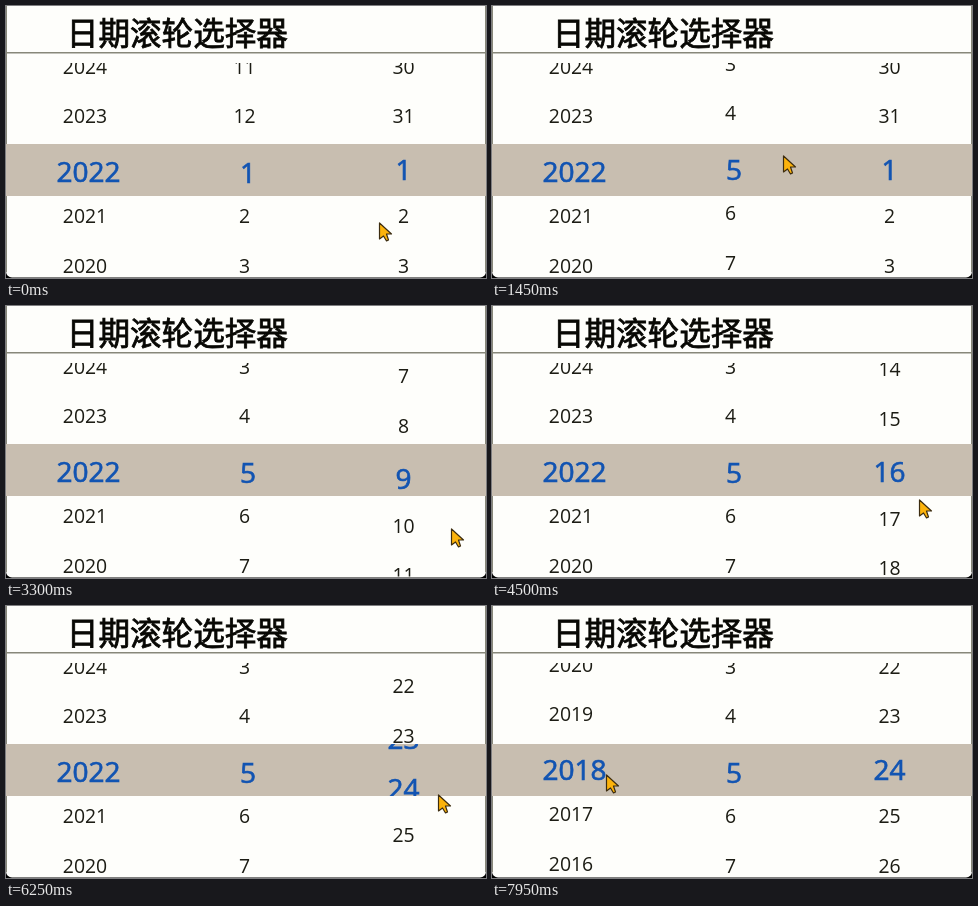
Recreate the animation shown at these times as an HTML page with a canvas. Size 480x272 px, loop 8000 ms.

```html
<!DOCTYPE html>
<html lang="zh">
<head>
<meta charset="utf-8">
<title>日期滚轮选择器</title>
<style>
  html, body { margin: 0; width: 100%; height: 100%; overflow: hidden; background: #000; }
  canvas { display: block; }
</style>
</head>
<body>
<canvas id="stage" width="480" height="272"></canvas>
<script>
const ctx = document.getElementById('stage').getContext('2d');
const LOOP = 8000;
const ROW = 49.75;
const BAND = { top: 138, height: 52 };
const PAPER = '#fefefb', INK = '#1c1c14', BLUE = '#1254b2', RULE = '#88887a', BAND_COLOR = '#c8beb0';

const clamp = u => Math.min(1, Math.max(0, u));
const ease = u => u * u * (3 - 2 * u);
const wrap = (n, size) => ((n - 1) % size + size) % size + 1;

// Each flick is [start time, rows]; a longer flick takes more time.
const flickProgress = (t, start, rows) => ease(clamp((t - start) / (400 + 100 * Math.abs(rows))));

const wheels = [
  { x: 79, bigX: 82.5, bigY: 165.6, label: i => 2022 - i,
    flicks: [[7140, 4.04]] },
  { x: 238.5, bigX: 242, bigY: 166.6, label: i => wrap(1 + i, 12),
    flicks: [[300, 2], [840, 2.06], [1450, -0.06]] },
  { x: 397.5, bigX: 397.5, bigY: 163.6, label: i => wrap(1 + i, 31),
    flicks: [[1750, 4], [2608, 4], [3459, 7], [5212, 8]] }
];

const wheelPosition = (wheel, t) =>
  wheel.flicks.reduce((sum, [start, rows]) => sum + rows * flickProgress(t, start, rows), 0);

// Pointer tip at its turning points.
const stops = [
  { t: 0, x: 373, y: 217 }, { t: 850, x: 250, y: 222 }, { t: 1450, x: 291, y: 150 },
  { t: 1750, x: 398, y: 222 }, { t: 2550, x: 426, y: 100 }, { t: 3300, x: 445, y: 223 },
  { t: 3800, x: 457, y: 100 }, { t: 4500, x: 427, y: 194 }, { t: 5600, x: 455, y: 48 },
  { t: 6250, x: 432, y: 189 }, { t: 7000, x: 218, y: 188 }, { t: 7420, x: 100, y: 2 },
  { t: 7950, x: 114, y: 169 }, { t: LOOP, x: 114, y: 169 }
];

function pointerAt(t) {
  const n = stops.findIndex(stop => stop.t > t);
  const a = stops[n - 1], b = stops[n];
  const u = ease((t - a.t) / (b.t - a.t));
  return [a.x + (b.x - a.x) * u, a.y + (b.y - a.y) * u];
}

function clipped(top, height, draw) {
  ctx.save();
  ctx.beginPath();
  ctx.rect(0, top, 480, height);
  ctx.clip();
  draw();
  ctx.restore();
}

function boldText(text, x, y, weight) {
  ctx.fillText(text, x, y);
  if (!weight) return;
  ctx.lineWidth = weight;
  ctx.strokeText(text, x, y);
}

function drawRows(wheel, t, x, centerY, size, color, weight) {
  const position = wheelPosition(wheel, t);
  const nearest = Math.round(position);
  ctx.font = `${size}px "Open Sans", "Noto Sans", sans-serif`;
  ctx.textAlign = 'center';
  ctx.fillStyle = ctx.strokeStyle = color;
  for (let i = nearest - 3; i <= nearest + 3; i++) {
    boldText(wheel.label(i), x, centerY + (i - position) * ROW + size * 0.357, weight);
  }
}

function drawPage() {
  ctx.fillStyle = '#000';
  ctx.fillRect(0, 0, 480, 272);
  ctx.fillStyle = PAPER;
  ctx.beginPath();
  ctx.roundRect(0, 0, 480, 271.5, [0, 0, 6, 6]);
  ctx.fill();
  ctx.fillStyle = RULE;
  ctx.fillRect(0, 0, 1, 266);
  ctx.fillRect(479, 0, 1, 266);
  ctx.fillRect(0, 46, 480, 1.5);

  ctx.font = '31.6px "Noto Sans CJK SC", "Noto Sans CJK", sans-serif';
  ctx.textAlign = 'left';
  ctx.fillStyle = ctx.strokeStyle = '#080804';
  boldText('日期滚轮选择器', 60.8, 39, 0.8);
}

function drawPointer(x, y) {
  ctx.save();
  ctx.translate(x + 0.5, y);
  ctx.beginPath();
  [[0, 0], [0, 16], [4, 13], [7, 18], [9, 17], [7, 11], [12, 11]]
    .forEach(point => ctx.lineTo(...point));
  ctx.closePath();
  ctx.lineJoin = 'round';
  ctx.lineWidth = 1.2;
  ctx.fillStyle = '#fcb30c';
  ctx.strokeStyle = '#3c2c10';
  ctx.fill();
  ctx.stroke();
  ctx.restore();
}

function draw(t) {
  drawPage();
  clipped(57, 213.5, () => wheels.forEach(wheel =>
    drawRows(wheel, t, wheel.x, 160.1, 19.4, INK, 0)));
  ctx.fillStyle = BAND_COLOR;
  ctx.fillRect(0, BAND.top, 480, BAND.height);
  clipped(BAND.top, BAND.height, () => wheels.forEach(wheel =>
    drawRows(wheel, t, wheel.bigX, wheel.bigY, 28, BLUE, 0.7)));
  drawPointer(...pointerAt(t));
}

function frame() {
  draw(performance.now() % LOOP);
  requestAnimationFrame(frame);
}
frame();
</script>
</body>
</html>
```
